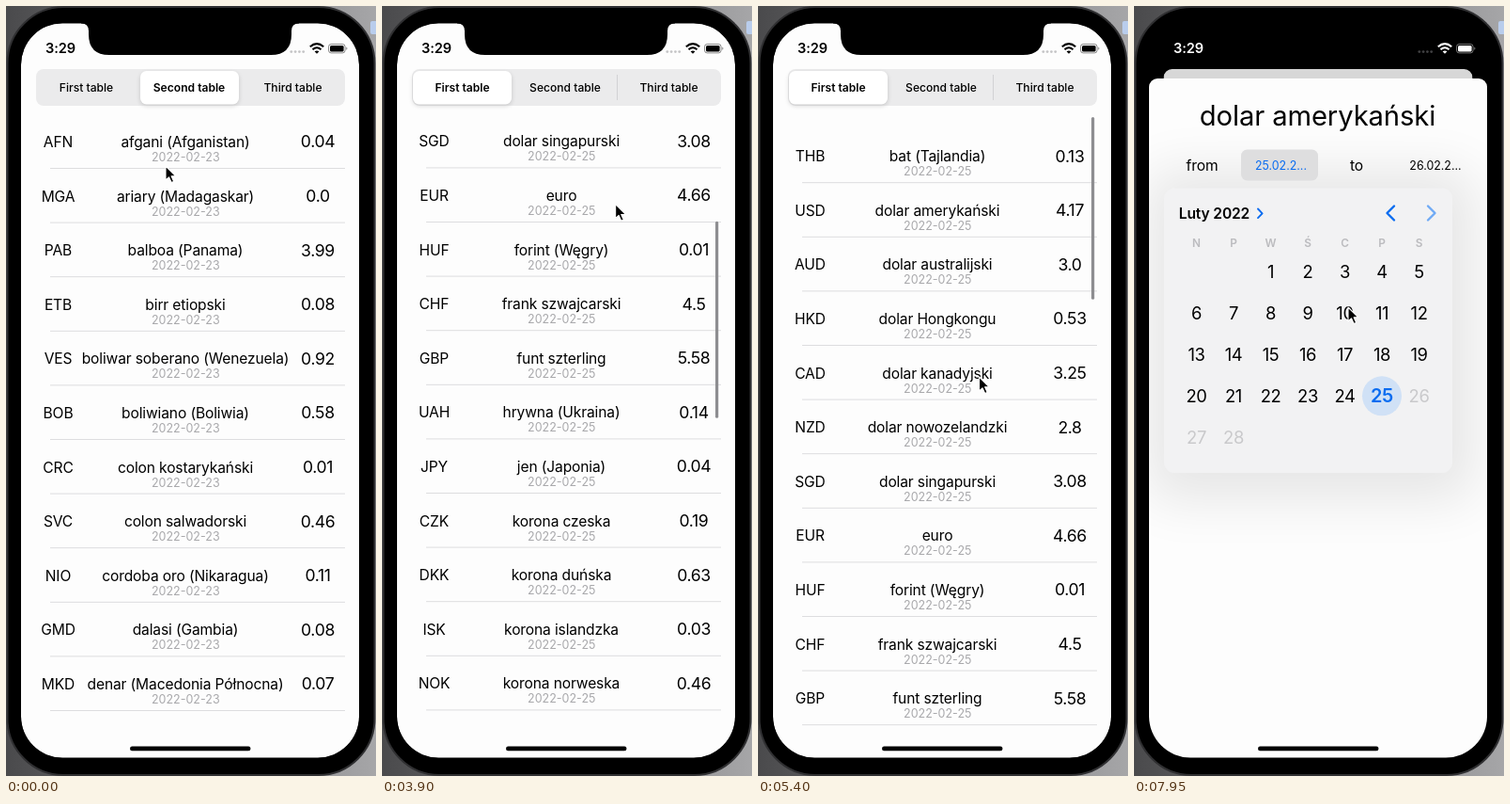
Animation of 394x818 px, one loop 8000 ms. Source, as an HTML page:

```html
<!DOCTYPE html>
<html lang="pl">
<head>
<meta charset="utf-8">
<title>Currency tables</title>
<style>
  html, body { margin: 0; width: 100%; height: 100%; overflow: hidden; background: #555; }
  svg { display: block; width: 394px; height: 818px; }
  text { font-family: Inter, Roboto, sans-serif; text-anchor: middle; }
  .cell { font-size: 15.6px; letter-spacing: -.009em; }
  .value { font-size: 17.6px; letter-spacing: -.02em; }
  .date { font-size: 12.5px; fill: #a9a9ac; }
  .tab { font-size: 12.1px; font-weight: 500; }
  .picker { font-size: 12.4px; }
  .day { font-size: 18.4px; letter-spacing: -.02em; }
  .week { font-size: 11.8px; font-weight: 600; fill: #bbbbbe; }
  .muted { fill: #c9c9cb; }
</style>
</head>
<body>
<svg id="stage" viewBox="0 0 394 818">
  <defs>
    <linearGradient id="desk" x1="0" y1="0" x2="1" y2="0">
      <stop offset="0" stop-color="#4a4a4c"/><stop offset="1" stop-color="#a6a6a8"/>
    </linearGradient>
    <clipPath id="screenClip"><rect x="16" y="18.5" width="360" height="780" rx="44"/></clipPath>
    <clipPath id="cardClip"><rect id="cardShape" x="16" y="18" width="360" height="781"/></clipPath>
    <clipPath id="listClip"><rect x="16" y="115" width="360" height="651"/></clipPath>
    <filter id="soft" x="-30%" y="-30%" width="160%" height="160%"><feGaussianBlur stdDeviation="2.5"/></filter>
    <filter id="wide" x="-50%" y="-50%" width="200%" height="200%"><feGaussianBlur stdDeviation="28"/></filter>
  </defs>

  <rect width="394" height="818" fill="url(#desk)"/>
  <rect x="388" y="16" width="8" height="14" rx="2" fill="#b9cdec"/>
  <rect x="1.5" y="1" width="391" height="816" rx="60" fill="#000" stroke="#303032" stroke-width="2"/>

  <g clip-path="url(#screenClip)">
    <g id="card"><g clip-path="url(#cardClip)">
      <rect x="16" y="18" width="360" height="781" fill="#fdfdfd"/>
      <rect x="32" y="67" width="329" height="39" rx="8" fill="#ebebec"/>
      <path id="tabLine" d="M250.5 73V100" stroke="#d2d2d4"/>
      <g id="thumb">
        <rect x="33" y="71" width="105" height="35" rx="6.5" opacity=".16" filter="url(#soft)"/>
        <rect x="33" y="69" width="105" height="35.5" rx="6.5" fill="#fff"/>
      </g>
      <g id="tabs"></g>
      <g clip-path="url(#listClip)"><g id="list"></g></g>
      <rect id="bar" x="355" width="3.2" rx="1.6" fill="#8e8e91"/>
      <g id="spinner" transform="translate(195 407)"></g>
      <rect id="dim" x="16" y="18" width="360" height="781"/>
    </g></g>

    <g id="sheet">
      <rect x="16" y="77" width="360" height="760" rx="9" fill="#fdfdfd"/>
      <rect id="popShade" x="14" y="175" width="348" height="350" rx="20" filter="url(#wide)"/>
      <text x="195.5" y="127" font-size="29.2" letter-spacing="-.1">dolar amerykański</text>
      <text class="cell" x="72.5" y="175">from</text>
      <rect id="fromBox" x="114" y="152.5" width="82" height="33" rx="6.5"/>
      <text class="picker" id="fromDate" x="156.5" y="173.5">25.02.2...</text>
      <text class="cell" x="237" y="175">to</text>
      <text class="picker" x="321" y="173.5">26.02.2...</text>
      <g id="popover">
        <rect x="32" y="193.5" width="307" height="302.5" rx="11" fill="#f2f2f3"/>
        <text x="85.5" y="226" font-size="15.6" font-weight="600" letter-spacing="-.15">Luty 2022</text>
        <g fill="none" stroke="#0a6cf0" stroke-linecap="round" stroke-linejoin="round" stroke-width="2.4">
          <path d="M132 215.5L136.6 220.3L132 225.1" stroke-width="1.9"/>
          <path d="M277 212.5L269.5 220L277 227.5"/>
          <path d="M313 212.5L320.5 220L313 227.5" stroke="#6faaf5"/>
        </g>
        <circle cx="264" cy="414.3" r="21" fill="#d0e1f6"/>
        <g id="days"></g>
      </g>
    </g>
  </g>

  <path d="M80 18.5Q88 18.5 88 26.5V30Q88 52 110 52H282Q304 52 304 30V26.5Q304 18.5 312 18.5V16H80Z"/>
  <g id="status">
    <text x="58" y="50.3" font-size="14.6" font-weight="600" letter-spacing="-.1">3:29</text>
    <g fill="none" stroke="currentColor" stroke-width="2">
      <path d="M323.8 43.2Q331 37 338.2 43.2M326.5 46.2Q331 42.3 335.5 46.2"/>
      <rect x="343.5" y="40.5" width="17.6" height="9.4" rx="2.8" stroke-width="1" opacity=".45"/>
    </g>
    <path d="M328.6 48.3Q331 46.5 333.4 48.3L331 50.8Z"/>
    <rect x="345" y="42" width="14.6" height="6.4" rx="1.5"/>
    <path d="M362.3 43.6Q364.6 45.2 362.3 46.8Z" opacity=".5"/>
  </g>
  <g id="dots"></g>
  <rect id="home" x="132" y="786.5" width="128.5" height="4.8" rx="2.4"/>
  <path id="cursor" d="M0 0V15L3.5 11.8L6.1 17.5L8.6 16.4L6.1 10.8H10.8Z" stroke="#fff" stroke-width="1.1" stroke-linejoin="round"/>
</svg>

<script>
const LOOP = 8000, ROW = 57.6;
const $ = id => document.getElementById(id);
const svgNode = (tag, attrs, parent, content = '') => {
  const node = document.createElementNS('http://www.w3.org/2000/svg', tag);
  for (const key in attrs) node.setAttribute(key, attrs[key]);
  node.textContent = content;
  return parent.appendChild(node);
};
const set = (id, attrs) => { for (const key in attrs) $(id).setAttribute(key, attrs[key]); };

const exotic = `AFN|afgani (Afganistan)|0.04
MGA|ariary (Madagaskar)|0.0
PAB|balboa (Panama)|3.99
ETB|birr etiopski|0.08
VES|boliwar soberano (Wenezuela)|0.92
BOB|boliwiano (Boliwia)|0.58
CRC|colon kostarykański|0.01
SVC|colon salwadorski|0.46
NIO|cordoba oro (Nikaragua)|0.11
GMD|dalasi (Gambia)|0.08
MKD|denar (Macedonia Północna)|0.07`;
const common = `THB|bat (Tajlandia)|0.13
USD|dolar amerykański|4.17
AUD|dolar australijski|3.0
HKD|dolar Hongkongu|0.53
CAD|dolar kanadyjski|3.25
NZD|dolar nowozelandzki|2.8
SGD|dolar singapurski|3.08
EUR|euro|4.66
HUF|forint (Węgry)|0.01
CHF|frank szwajcarski|4.5
GBP|funt szterling|5.58
UAH|hrywna (Ukraina)|0.14
JPY|jen (Japonia)|0.04
CZK|korona czeska|0.19
DKK|korona duńska|0.63
ISK|korona islandzka|0.03
NOK|korona norweska|0.46
SEK|korona szwedzka|0.44`;

function buildTable(source, date) {
  const table = svgNode('g', {}, $('list'));
  source.split('\n').forEach((line, i) => {
    const [code, name, value] = line.split('|');
    const y = 115 + i * ROW;
    const put = (cls, x, dy, text) => svgNode('text', { class: cls, x, y: y + dy }, table, text);
    put('cell', 55.5, 35, code);
    put('cell', 191, 35, name);
    put('date', 191.3, 50, date);
    put('value', 332, 35.4, value);
    svgNode('path', { d: `M47 ${y + ROW - .1}H361`, stroke: '#dddddf' }, table);
  });
  return table;
}
const exoticTable = buildTable(exotic, '2022-02-23');
const commonTable = buildTable(common, '2022-02-25');

const tabs = ['First table', 'Second table', 'Third table'].map((label, i) =>
  svgNode('text', { class: 'tab', x: 85.5 + i * 110 - (i == 1 ? .5 : 0), y: 91 }, $('tabs'), label));

const spokes = Array.from({ length: 8 }, (_, i) => svgNode('path', {
  d: 'M0 -9V-14.6', stroke: '#3c3c40', 'stroke-width': 5, 'stroke-linecap': 'round',
  transform: `rotate(${i * 45})` }, $('spinner')));

for (let i = 0; i < 4; i++) svgNode('circle', { cx: 303.8 + i * 4.3, cy: 48.6, r: 1.4 }, $('dots'));

const column = i => 66.5 + i * 39.5;
[...'NPWŚCPS'].forEach((d, i) => svgNode('text', { class: 'week', x: column(i), y: 255.8 }, $('days'), d));
for (let day = 1; day <= 28; day++) {
  const cell = day + 1;
  const attrs = { class: day > 25 ? 'day muted' : 'day', x: column(cell % 7), y: 289.2 + Math.floor(cell / 7) * 44 };
  if (day == 25) Object.assign(attrs, { fill: '#0a6cf0', style: 'font-weight:600;font-size:20px' });
  svgNode('text', attrs, $('days'), day);
}

const clamp = x => Math.max(0, Math.min(1, x));
const mix = (a, b, p) => a + (b - a) * p;
const linear = p => p;
const smooth = p => p * p * (3 - 2 * p);
const out = p => 1 - (1 - p) ** 3;
const ramp = (t, from, to) => smooth(clamp((t - from) / (to - from)));
const spring = ms => { const x = Math.max(0, ms) * .0183; return 1 - (1 + x) * Math.exp(-x); };

// Each step is [time, values, easing into it].
function follow(steps, t) {
  const next = steps.findIndex(s => s[0] > t);
  if (next < 0) return steps[steps.length - 1][1];
  if (next == 0) return steps[0][1];
  const [t0, a] = steps[next - 1], [t1, b, ease = smooth] = steps[next];
  const p = ease((t - t0) / (t1 - t0));
  return a.map((v, i) => mix(v, b[i], p));
}
const pointer = [
  [0, [170, 170]], [700, [91, 90]], [1100, [91, 90]], [1750, [261, 271]],
  [2600, [262, 354]], [3200, [262, 354]], [3450, [249, 211], linear],
  [4550, [248, 210]], [4800, [236, 394], linear], [5450, [235.5, 394]],
  [5920, [219, 205]], [6450, [219, 205]], [6950, [157, 168]],
  [7300, [157, 168]], [7900, [228, 320]]
];
const scrolling = [
  [3200, [0]], [3450, [143], linear], [4350, [375], out], [4550, [375]],
  [4800, [191], linear], [5080, [0], linear], [5230, [-59], out], [5700, [0], out]
];

function render(t) {
  const select = ramp(t, 850, 1150);
  set('thumb', { transform: `translate(${mix(110, 0, select)} 0)` });
  set('tabLine', { opacity: select });
  tabs.forEach((tab, i) => tab.style.fontWeight = i == (select < .5 ? 1 : 0) ? 600 : 500);

  const loaded = t >= 2250;
  exoticTable.style.display = loaded ? 'none' : '';
  commonTable.style.display = loaded ? '' : 'none';
  $('spinner').style.display = t >= 900 && !loaded ? '' : 'none';
  const head = (Math.floor(t / 100) + 5) % 8;
  spokes.forEach((spoke, i) => {
    const age = (head - i + 8) % 8;
    spoke.setAttribute('opacity', Math.max(.33, .95 - age * .14));
  });

  const [scroll] = follow(scrolling, t);
  set('list', { transform: `translate(0 ${-scroll})` });
  set('bar', { y: 118 + Math.max(0, scroll) * .32, height: 209 + Math.min(0, scroll), opacity: ramp(t, 3200, 3350) });

  const open = spring(t - 6079.6);
  set('card', { transform: `translate(196 ${mix(18, 67, open)}) scale(${mix(1, .914, open)}) translate(-196 -18)` });
  set('cardShape', { rx: mix(44, 10, Math.min(1, open * 1.3)) });
  set('dim', { opacity: .15 * open });
  set('sheet', { transform: `translate(0 ${722 * (1 - open)})` });
  const glow = Math.round(255 * clamp((open - .6) / .4));
  const ink = `rgb(${glow},${glow},${glow})`;
  set('status', { fill: ink, color: ink });
  set('dots', { fill: open > .5 ? '#414143' : '#c4c4c6' });
  set('home', { fill: open > .02 && open < .9 ? '#555' : '#000' });

  const pop = out(clamp((t - 7180) / 300));
  const size = mix(.4, 1, pop);
  set('popover', { opacity: pop, transform: `translate(155 185) scale(${size}) translate(-155 -185)` });
  set('popShade', { opacity: .09 * pop });
  set('fromBox', { fill: pop > .5 ? '#dededf' : '#ebebec' });
  set('fromDate', { fill: t >= 7150 ? '#0a6cf0' : '#000' });

  set('cursor', { transform: `translate(${follow(pointer, t).join(' ')})` });
}

const start = performance.now();
function tick() {
  render((performance.now() - start) % LOOP);
  requestAnimationFrame(tick);
}
tick();
</script>
</body>
</html>
```
